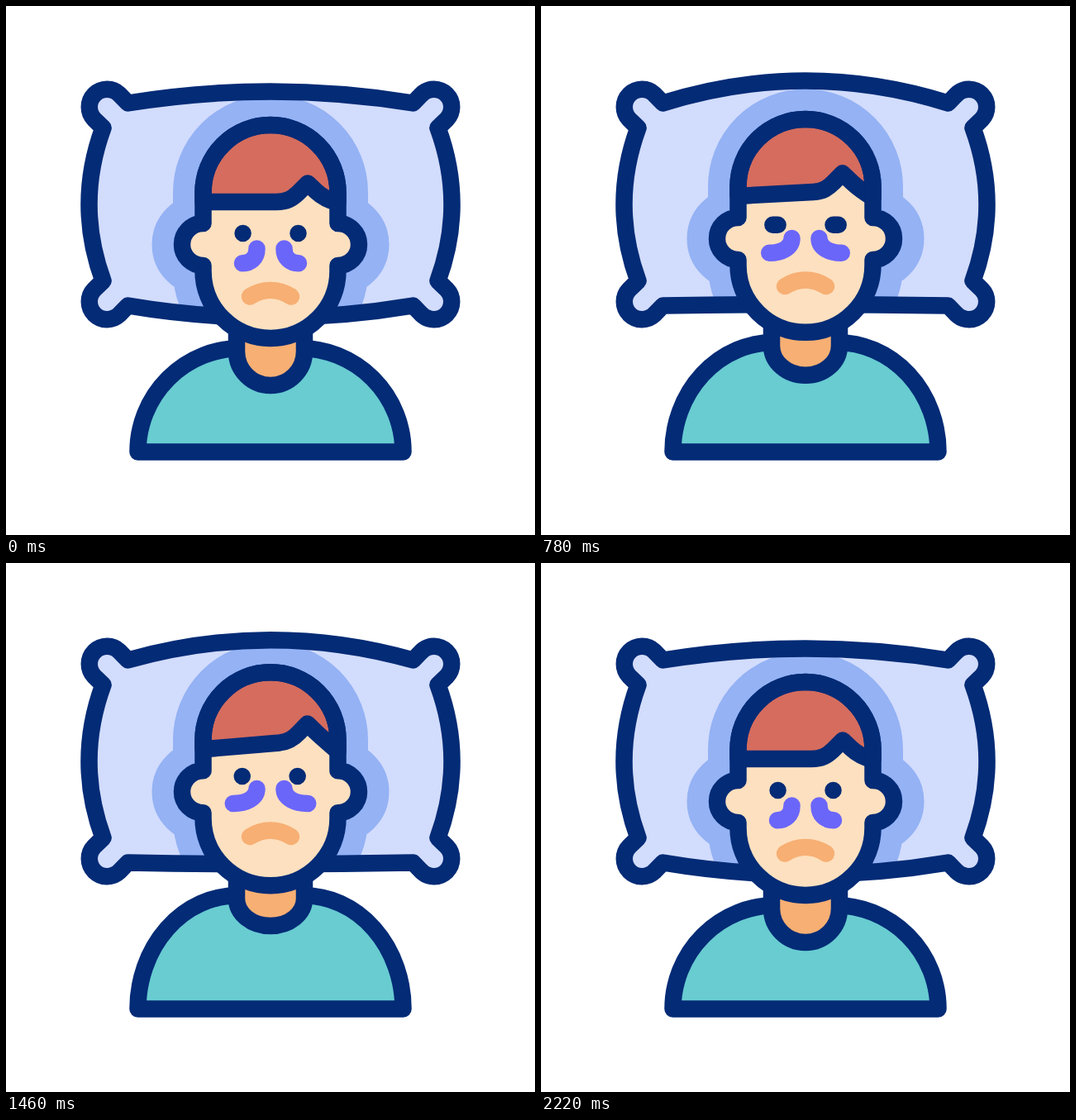
These frames come from a looping animation (640 px wide and 640 px high, 2.4 s). An HTML page:

```html
<!DOCTYPE html>
<html lang="en">
<head>
<meta charset="utf-8">
<title>Restless sleeper</title>
<style>
  html, body { margin: 0; width: 100%; height: 100%; overflow: hidden; background: #fff; }
  svg { display: block; width: 100%; height: 100%; }
  path { fill: none; stroke-linecap: round; stroke-linejoin: round; stroke-width: 20.5; }
  .line { stroke: #032b76; }
  .bag { stroke: #6b66fa; }
</style>
</head>
<body>
<svg viewBox="0 0 640 640">
  <defs><clipPath id="clip"><path id="pillowClip"/></clipPath></defs>
  <path id="pillowFill" style="fill:#d2dcfd"/>
  <g clip-path="url(#clip)">
    <path id="shadow" style="fill:#94b2f4;stroke:#94b2f4;stroke-width:73"/>
  </g>
  <path id="pillow" class="line"/>
  <path id="shirt" class="line" style="fill:#68ccd1"/>
  <path id="neck" class="line" style="fill:#f7af73"/>
  <g id="head">
    <path id="face" style="fill:#fde0bf"/>
    <path id="hair" class="line" style="fill:#d56c5e"/>
    <path id="outline" class="line"/>
  </g>
  <path id="eyes" class="line"/>
  <path id="bagL" class="bag"/>
  <path id="bagR" class="bag"/>
  <path id="mouth" style="stroke:#f7af73" d="M295 351.5C311 341.5 329 341.5 345 351.5"/>
</svg>
<script>
const LOOP = 2400, STEP = 20, LAG = 92;
const $ = id => document.getElementById(id);
const draw = (id, d) => $(id).setAttribute('d', d);
const shift = (id, y) => $(id).setAttribute('transform', `translate(0 ${y})`);
const mix = (a, b, k) => a + (b - a) * k;

const ramp = (t, a, b) => {
  const x = Math.min(1, Math.max(0, (t - a) / (b - a)));
  return x * x * (3 - 2 * x);
};

// Two breaths: rise and fall of each
const breaths = t => [
  ramp(t, 0, 525), ramp(t, 525, 1040),
  ramp(t, 1060, 1600), ramp(t, 1610, 2140)
];
const sum = ([up1, down1, up2, down2]) => up1 - down1 + up2 - down2;

const HEAD = 'M238.5 225.5A81.5 81.5 0 0 1 401.5 225.5V263A25.5 25.5 0 0 1 401.5 314' +
  'V320.5A81.5 81.5 0 0 1 238.5 320.5V314A25.5 25.5 0 0 1 238.5 263Z';
for (const id of ['shadow', 'face', 'outline']) draw(id, HEAD);

const HAIR_REST = [327, 237, 340, 237, 346, 233, 353, 226.5, 365, 214.5, 375, 224, 382, 230.5, 391, 235.5, 401.5, 238];
const HAIR_UP = [332, 227.5, 343, 226, 349, 221, 354.5, 215, 364.5, 204.5, 377, 216.5, 385, 224, 393, 231, 401.5, 240];

function hairPath(k) {
  const p = HAIR_REST.map((v, i) => mix(v, HAIR_UP[i], k));
  return `M238.5 237L${p.slice(0, 2)}C${p.slice(2, 8)}L${p.slice(8, 12)}C${p.slice(12)}` +
    'V225.5A81.5 81.5 0 0 0 238.5 225.5Z';
}

function pillowPath(k) {
  const knob = 'A21.5 21.5 0 0 1 ';
  return `M117.5 147.5L106.8 137.2${knob}137.2 106.8L147.5 117.5` +
    `Q320 ${mix(89.5, 55.5, k)} 492.5 117.5L502.8 106.8${knob}533.2 137.2L522.5 147.5` +
    `Q556.5 240 522.5 332.5L533.2 342.8${knob}502.8 373.2L492.5 362.5` +
    `Q320 ${mix(391.5, 349.5, k)} 147.5 362.5L137.2 373.2${knob}106.8 342.8L117.5 332.5` +
    'Q83.5 240 117.5 147.5Z';
}

function shirtPath(k) {
  const top = mix(414, 400, k), inX = mix(285, 279, k), outX = 640 - inX;
  const rx = inX - 159.5, ry = 539.5 - top;
  return `M159.5 539.5A${rx} ${ry} 0 0 1 ${inX} ${top}H${outX}A${rx} ${ry} 0 0 1 480.5 539.5Z`;
}

function neckPath(k) {
  const y = mix(418, 404, k);
  return `M279 ${y - 38}V${y}A41 ${mix(41, 31, k)} 0 0 0 361 ${y}V${y - 38}`;
}

function bagPath(k, stretch, side) {
  const x = v => 320 + side * v, y = mix(293.5, 269, k);
  return `M${x(16.5)} ${y}C${x(16.5)} ${y + 11.5} ${x(mix(24, 30, stretch))} ${y + 17.8} ` +
    `${x(mix(34, 46, stretch))} ${y + 17.8}`;
}

function render(t) {
  const phases = breaths(t), [up1, down1, up2, down2] = phases;
  const k = sum(phases), puff = sum(breaths(t - LAG));
  const squint = up1 - down1, drift = up2 - down2;
  const stretch = up1 - 0.38 * down1 + 0.38 * up2 - down2;

  const pillow = pillowPath(puff);
  for (const id of ['pillowClip', 'pillowFill', 'pillow']) draw(id, pillow);
  draw('shirt', shirtPath(k));
  draw('neck', neckPath(k));
  draw('hair', hairPath(k));
  shift('head', -14 * k);
  shift('shadow', -14 * k);
  shift('mouth', -24.5 * k);

  const eyeY = mix(275, 254.7, k), l = 286.6 - drift, r = 353.5 - drift;
  draw('eyes', `M${l} ${eyeY}H${l - 12.2 * squint - 0.01}M${r} ${eyeY}H${r + 12.2 * squint + 0.01}`);
  draw('bagL', bagPath(k, stretch, -1));
  draw('bagR', bagPath(k, stretch, 1));
}

const start = performance.now();
function tick() {
  const t = (performance.now() - start) % LOOP;
  render(Math.min(2220, Math.floor(t / STEP) * STEP));
  requestAnimationFrame(tick);
}
tick();
</script>
</body>
</html>
```
